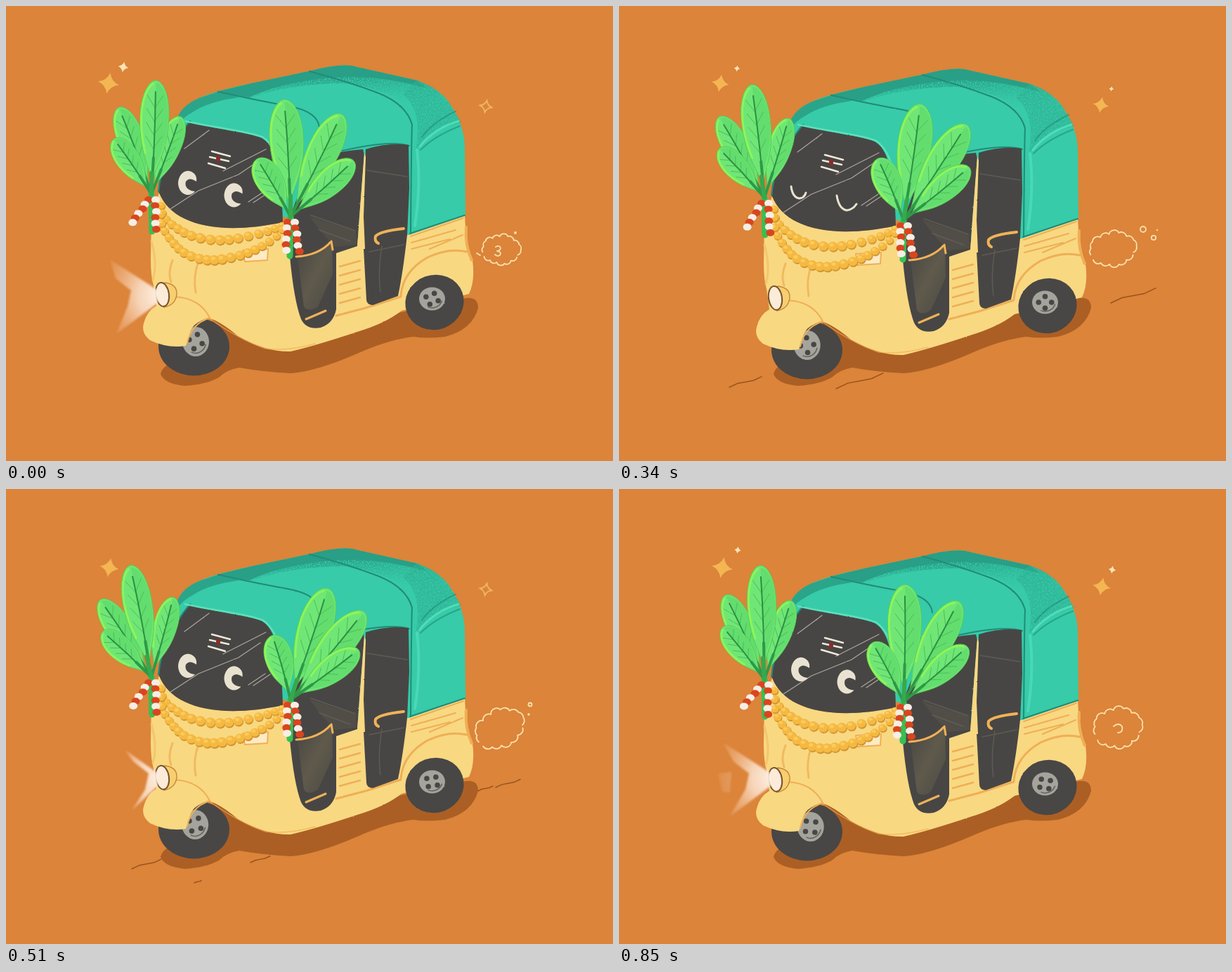
Write an HTML page that moves like this. It is 864 px wide and 648 px high and loops after 1020 ms.

```html
<!DOCTYPE html>
<html lang="en">
<head>
<meta charset="utf-8">
<title>Festive auto rickshaw</title>
<style>
html, body { margin: 0; width: 100%; height: 100%; overflow: hidden; background: #db843a; }
svg { display: block; width: 100vw; height: 100vh; }
.line { fill: none; stroke-linecap: round; stroke-linejoin: round; }
.leaf path { vector-effect: non-scaling-stroke; }
.trim { stroke: #efaf55; stroke-width: 3; }
.smoke { stroke: #fbe0ac; stroke-width: 1.8; }
.road { stroke: #9a531d; stroke-width: 1.5; }
</style>
</head>
<body>
<svg viewBox="0 0 864 648">
<defs>
  <filter id="rough" x="-5%" y="-5%" width="110%" height="110%" color-interpolation-filters="sRGB">
    <feTurbulence type="fractalNoise" baseFrequency=".35" numOctaves="2" seed="4"/>
    <feDisplacementMap in="SourceGraphic" scale="1.5" xChannelSelector="R" yChannelSelector="G"/>
  </filter>
  <filter id="grain" color-interpolation-filters="sRGB">
    <feTurbulence type="fractalNoise" baseFrequency=".55" numOctaves="2" seed="9"/>
    <feColorMatrix values="0 0 0 0 0  0 0 0 0 0  0 0 0 0 0  6 0 0 0 -2" result="dots"/>
    <feComposite in="SourceGraphic" in2="dots" operator="in"/>
  </filter>
  <filter id="soft"><feGaussianBlur stdDeviation="1.5"/></filter>
  <radialGradient id="glow" gradientUnits="userSpaceOnUse" cx="220" cy="412" r="90">
    <stop offset="0" stop-color="#fff3e6"/>
    <stop offset=".35" stop-color="#fbe3cf" stop-opacity=".85"/>
    <stop offset=".75" stop-color="#f3b98c" stop-opacity=".55"/>
    <stop offset="1" stop-color="#ec9c5e" stop-opacity=".4"/>
  </radialGradient>
  <linearGradient id="top" x1="0" y1="0" x2=".25" y2="1">
    <stop offset=".3" stop-color="#279c83"/>
    <stop offset="1" stop-color="#2fb898" stop-opacity="0"/>
  </linearGradient>
  <linearGradient id="seat" x1="0" y1="0" x2="1" y2="1">
    <stop offset="0" stop-color="#484644"/>
    <stop offset=".5" stop-color="#5f5a4b"/>
    <stop offset="1" stop-color="#4c4a45"/>
  </linearGradient>
</defs>
<rect width="864" height="648" fill="#db843a"/>
<path fill="#ac5f24" d="M220 524Q224 509 245 507L300 440L400 470L640 420Q672 408 672 430Q664 461 625 471Q598 474 580 471Q545 475 500 495Q440 521 405 523Q365 521 332 515Q314 518 303 529Q285 539 254 541Q225 538 220 524Z"/>
<g id="roads" class="line road"></g>

<g id="cab"><g filter="url(#rough)">
  <ellipse cx="267.500" cy="485" rx="50.500" ry="41.500" fill="#484745"/>
  <g id="frontHub"></g>
  <path fill="#f9d882" d="M207 300L218 266C235 310 300 328 394 308L405 300H512L573 325L653 298Q654 335 664 362Q668 392 659 410L563 434Q540 452 500 464Q440 484 405 492Q370 493 330 470Q305 449 288 444Q264 452 262 466L256 484Q230 488 205 476Q192 466 196 452Q200 435 214 427L210 398Q206 385 206 360Z"/>
  <g class="line trim">
    <path d="M240 414Q276 416 290 444Q263 453 258 480" stroke-width="2"/>
    <path d="M237 362Q230 380 235 393M274 364Q266 385 270 408" opacity=".75"/>
    <path d="M290 445Q335 477 370 488Q400 492 440 481" stroke-width="1.500" opacity=".7"/>
    <path d="M470 441L512 430L562 414M562 412Q565 378 600 358Q630 344 656 350"/>
    <path d="M576 328L651 302M577 337L640 319M577 346L632 332M603 346L650 326" stroke-width="2"/>
    <path d="M655 315Q653 341 663 362" stroke-width="4"/>
    <g id="slats" stroke-width="2.500"></g>
    <path fill="#fdebc5" d="M337 348L373 346L372 362L340 364Z" stroke-width="2"/>
  </g>
  <path d="M207 335Q216 367 209 390" class="line" stroke="#f4c66c" stroke-width="3"/>

  <path fill="#37cba9" d="M242 165Q246 145 275 131Q300 120 350 110L435 92Q480 80 500 87L585 106Q622 120 634 143Q652 170 653 200L654 298L574 326L500 330L395 300L240 200Z"/>
  <path fill="url(#top)" filter="url(#grain)" d="M300 122L350 110L435 92Q480 80 500 87L585 106Q612 115 621 127L578 148Q540 116 480 110Q400 111 345 132Z"/>
  <path fill="#289f86" d="M300 122L350 110L432 93L460 102Q390 109 346 130ZM432 93Q480 80 500 87L585 106L600 117Q520 96 470 102Z"/>
  <path fill="#2aa58a" d="M243 162Q249 142 275 131L302 122L332 130Q288 136 266 151Q253 158 247 166Z"/>
  <path fill="#2eb294" filter="url(#grain)" d="M584 106Q620 119 634 143L648 166Q612 173 583 205Q594 150 565 125Z" opacity=".7"/>
  <g class="line" stroke="#218b77" stroke-width="2">
    <path d="M302 122Q350 133 405 143Q444 151 446 173M432 93Q485 107 530 124Q570 140 578 169Q577 190 576 324"/>
    <path d="M640 150Q606 166 592 187M646 171Q610 185 590 205" opacity=".6"/>
    <path d="M575 324L653 298M440 216Q540 188 574 199"/>
    <path d="M262 165Q222 215 218 264" stroke-width="4"/>
    <path d="M585 205Q591 255 582 313" stroke="#49d8b8" stroke-width="4"/>
    <path d="M644 164Q610 174 589 200" stroke="#50ddb9" stroke-width="3"/>
  </g>

  <path fill="#484644" d="M262 165C300 176 345 180 364 188C382 198 392 230 394 308C300 328 235 310 218 266Q222 215 262 165Z"/>
  <path class="line" stroke="#5ce0bb" stroke-width="2.500" d="M255 164C300 174 345 178 366 187Q384 200 390 230"/>
  <path class="line" stroke="#aaa69f" stroke-width="1.200" d="M254 203L289 177M309 235L370 204M234 289L274 263L331 240L362 219M345 279L369 263M352 280L376 264"/>
  <path fill="#484644" d="M436 218Q470 207 508 204L510 212L503 300L500 342L470 352V432Q466 452 448 458Q428 462 420 446Q410 420 404 357V300Z"/>
  <path fill="#484644" d="M512 204Q545 194 573 198L574 260L571 326Q565 380 558 413L522 426Q513 425 513 418L509 345L508 300Z"/>
  <path fill="#f9d882" d="M510 209L503 300L500 346H511L509 300L512 215Z"/>
  <path fill="url(#seat)" d="M415 357Q448 354 464 336L465 382L444 428Q430 437 424 428Z"/>
  <path fill="#57544b" d="M432 300L498 321L499 340L468 343L448 321Z" opacity=".65"/>
  <path class="line" stroke="#66625a" stroke-width="1.500" opacity=".75" d="M434 298L497 320M446 319L490 335M514 234L571 243M535 342Q529 380 533 407M517 350L566 340"/>
  <g class="line" stroke="#f0b258" stroke-width="3">
    <path d="M413 357Q446 355 463 335L465 347M427 446L455 434"/>
    <path d="M566 317Q531 321 526 328Q524 335 530 338" stroke-width="4"/>
  </g>
  <ellipse cx="610" cy="422" rx="42" ry="39" fill="#484745" transform="rotate(-20 610 422)"/>
  <g id="rearHub"></g>

  <g id="face">
    <path class="line" stroke="#efe9dc" stroke-width="2.400" d="M293 207L319 214M290 215L317 221M288 224L312 231"/>
    <ellipse cx="302" cy="217.500" rx="3" ry="4.500" fill="#8e2c27"/>
    <g data-on="01345" fill="#e9e2d0">
      <path id="eye" d="M267 238C256 229 245 240 245 253C246 268 260 274 269 264C258 263 254 257 256 250Q261 243 271 250Q272 242 267 238Z"/>
      <use href="#eye" x="65.500" y="17.500"/>
    </g>
    <path data-on="2" class="line" stroke="#e9e2d0" stroke-width="3" d="M245 252Q247 268 257 269Q264 268 266 261M310 265Q313 284 324 286Q333 285 338 277"/>
  </g>
  <g id="garland"></g>
  <g id="plants"></g>
  <path fill="#f7ce70" stroke="#c58b39" stroke-width="1.500" d="M226 394Q244 396 243 411Q241 426 225 429Z"/>
  <ellipse cx="222.500" cy="411" rx="9.500" ry="17" fill="#fcebd8" stroke="#76532b" stroke-width="2" transform="rotate(-8 222 411)"/>
</g></g>
<g id="beams" fill="url(#glow)" filter="url(#soft)"></g>
<g id="stars"></g>
<g id="puffs" class="line smoke"></g>
</svg>
<script>
const LOOP = 1020;
const POSE = [0, 1, 2, 3, 2, 1];   // pose shown in each step
const DIP = [0, 3, 5, 0];          // how far the cab sinks in each pose
const rad = deg => deg * Math.PI / 180;
const at = id => document.getElementById(id);
const on = (steps, body) => `<g data-on="${steps}">${body}</g>`;
const perPose = draw => [0, 1, 2, 3].map(p =>
  on(POSE.map((q, i) => q == p ? i : '').join(''), draw(p))).join('');
const path = (d, attrs = '') => `<path d="${d}" ${attrs}/>`;
const stroke = (d, color, width) =>
  path(d, `class="line" stroke="${color}" stroke-width="${width}"`);
const oval = (x, y, rx, ry, fill) =>
  `<ellipse cx="${x}" cy="${y}" rx="${rx}" ry="${ry}" fill="${fill}"/>`;
// point at a clockwise angle from straight up
const polar = ([x, y], deg, r) => [x + r * Math.sin(rad(deg)), y - r * Math.cos(rad(deg))];

for (let i = 0; i < 5; i++)
  at('slats').innerHTML += path(`M475 ${371 + i * 13}l29-8`);

function hub(x, y, rx, ry, turn) {
  let s = oval(x, y, rx, ry, '#a4a49c');
  for (let a = turn; a < turn + 360; a += 90)
    s += oval(x + Math.cos(rad(a)) * rx * .5, y + Math.sin(rad(a)) * ry * .5, 3.8, 3.8, '#484745');
  return s + stroke(`M${x - rx * .3} ${y + ry * .72}A${rx * .78} ${ry * .78} 0 0 0 ${x + rx * .75} ${y + ry * .2}`, '#62625d', 1.5);
}
at('frontHub').innerHTML = perPose(p => hub(270 + 3 * Math.sin(p * 2), 478, 19, 21, 15 + p * 35));
at('rearHub').innerHTML = perPose(p => hub(606.5, 417, 18.5, 16.5, 20 + p * 35));

function beads(a, b, c, d, n) {
  let s = '';
  for (let i = 0; i <= n; i++) {
    const t = i / n, u = 1 - t;
    const mix = k => u * u * u * a[k] + 3 * u * u * t * b[k] + 3 * u * t * t * c[k] + t * t * t * d[k];
    const x = mix(0) + Math.sin(i * 5), y = mix(1) + Math.cos(i * 7);
    const r = 5.3 + 1.8 * Math.sin(Math.PI * t);
    s += oval(x + 1, y + 1.5, r, r, '#d19532') + oval(x, y, r, r - .5, '#f5b941') +
      oval(x - 1.5, y - 2, r * .45, r * .35, '#fbcb5e');
  }
  return s;
}
at('garland').innerHTML = perPose(p => {
  const sag = DIP[p] ? 6 : 0;
  return beads([221, 283], [228, 345 + sag], [340, 340 + sag], [394, 312], 16) +
    beads([221, 296], [226, 382 + sag], [345, 375 + sag], [392, 318], 19);
});

const BLADE = 'M.1 0C.25-.1 .36-.5 .68-.5C.88-.5 1-.24 1 0C1 .24 .88 .5 .68 .5C.36 .5 .25 .1 .1 0Z';
let veins = '';
for (let t = .4; t < .85; t += .12)
  veins += `M${t} 0L${t + .11} .28M${t} 0L${t + .11}-.28`;

// a unit leaf stretched from its base to its tip
function leaf(base, tip, w) {
  const dx = tip[0] - base[0], dy = tip[1] - base[1], k = w / Math.hypot(dx, dy);
  return `<g class="leaf" transform="matrix(${[dx, dy, -dy * k, dx * k, ...base]})">` +
    path(BLADE, 'fill="#70e676" stroke="#56cd58" stroke-width="1"') +
    path('M.15 0C.4 .03 .7 .04 .98 0C.98 .2 .88 .47 .68 .47C.4 .47 .3 .1 .15 0Z', 'fill="#63dd6d"') +
    stroke('M.36-.27Q.53-.46 .68-.46Q.9-.44 .97-.1', '#8cf559', 3) +
    stroke(veins, '#4dbd5a', 1) +
    stroke('M.1 0Q.5 .05 .9 0', '#2b9044', 2) +
    stroke('M0 0L.32 .02', '#2f9848', 4) + '</g>';
}

function tassel(top, deg, len, first) {
  let s = '';
  for (let i = 0; i < 6; i++) {
    const [x, y] = polar(top, deg, len * i / 5);
    s += oval(x + Math.sin(i * 4), y, 6, 5, (i + first) % 2 ? '#f6eee6' : '#d9451f');
  }
  return s;
}

// leaves: angle, length, width, share of the sway
const PLANTS = [
  {
    base: [207, 268], foot: [208, 321], sway: p => -4.3 * p, lean: 216,
    leaves: [[-20.5, 132, 37, 1], [20.5, 118, 33, .4], [2.3, 162, 41, 1], [-34, 95, 34, 1]]
  },
  {
    base: [405, 300], foot: [404, 356], sway: p => 18 * (p / 3) ** 1.6, lean: 184,
    leaves: [[-3, 167, 48, 1.2], [26.5, 163, 45, .75], [48.5, 120, 38, .3], [-30, 95, 39, .8]]
  }
];
function plant({ base, foot, sway, lean, leaves }, p) {
  const [x, y] = base, swing = 5 * Math.sin(p * 2);
  return stroke(`M${base}L${foot}`, '#38bf54', 9) +
    leaves.map(([deg, len, w, flex]) => leaf(base, polar(base, deg + sway(p) * flex, len), w)).join('') +
    stroke(`M${polar(base, sway(p), 30)}L${base}`, '#36a94c', 6) +
    tassel([x - 4, y + 8], lean + swing, 40, 0) +
    tassel([x + 6, y + 8], lean - 12 - (lean - 184) * .75 + swing / 2, 42, 1);
}
at('plants').innerHTML = perPose(p => PLANTS.map(one => plant(one, p)).join(''));

// light cone with a notch bitten out of its far side
const beam = (notch, tip = 148, top = 361, low = 467) =>
  path(`M215 404L${tip} ${top}L${Math.max(140, notch - 22)} 388L${notch} 405L${notch - 5} 428L${tip + 9} ${low}L216 423Z`);
at('beams').innerHTML = on('0', beam(178)) + on('1', beam(134)) + on('4', beam(182)) +
  on('3', beam(203, 170, 372, 458)) +
  on('5', beam(185) + path('M141 405L160 403L158 432L147 432Z', 'opacity=".6"'));

const GOLD = '#f4b653', CREAM = '#fce3b5';
function star(x, y, r, fill, line = 'none') {
  const k = r * .22;
  const d = `M0 ${-r}Q${k} ${-k} ${r} 0Q${k} ${k} 0 ${r}Q${-k} ${k} ${-r} 0Q${-k} ${-k} 0 ${-r}Z`;
  return path(d, `fill="${fill}" stroke="${line}" stroke-width="1.6" transform="translate(${x} ${y}) rotate(10)"`);
}
at('stars').innerHTML =
  on('0', star(146, 110, 15, GOLD) + star(167, 87, 7.5, CREAM)) +
  on('03', star(683, 143, 8.5, 'none', '#f6bd69')) +
  on('15', star(147, 112, 15, GOLD) + star(169, 87, 5, CREAM) + star(687, 139, 13, GOLD) + star(702, 115, 5.5, CREAM)) +
  on('24', star(144, 110, 12.5, GOLD) + star(168, 89, 4.5, CREAM) + star(686, 141, 11.5, GOLD) + star(701, 118, 3.5, CREAM)) +
  on('3', star(147, 112, 13.5, GOLD));

// scalloped oval, open at the left and lower right
function cloud(x, y, rx, ry, tilt = 0) {
  const arc = (from, to, n) => {
    let d = '';
    for (let i = 0; i <= n; i++) {
      const a = rad(from + (to - from) * i / n), k = 1 + .05 * Math.sin(i * 4);
      const r = rx * rad(to - from) / n * .55;
      d += (i ? `A${r} ${r} 0 0 1 ` : 'M') + `${x + rx * k * Math.cos(a)} ${y + ry * k * Math.sin(a)}`;
    }
    return d;
  };
  return path(arc(170, 385, 9) + arc(395, 510, 5), `transform="rotate(${tilt} ${x} ${y})"`);
}
const ring = (x, y, r) => `<circle cx="${x}" cy="${y}" r="${r}"/>`;
at('puffs').innerHTML =
  on('0', cloud(705, 347, 27, 19) + ring(725, 323, 1) +
    path('M670 352L675 355M697 343Q703 340 704 345Q703 349 699 349Q706 350 703 355Q699 357 696 354')) +
  on('15', cloud(710, 340, 34, 26, -8) + path('M704 338Q711 332 716 338Q718 347 710 347')) +
  on('24', cloud(703, 346, 33, 22, -8) + ring(746, 318, 4) + ring(761, 330, 3.2) + ring(766, 319, .4)) +
  on('3', cloud(703, 341, 36, 24, -26) + ring(746, 307, 2.5) + ring(744, 321, .8));

// a crack climbing to the right with a slight wobble
function crack([x, y, len]) {
  let d = `M${x} ${y}`;
  for (let t = .25; t <= 1; t += .25)
    d += `L${x + len * t} ${y - len * (.33 * t + .035 * Math.sin(t * 2 * Math.PI))}`;
  return path(d);
}
const roads = (...list) => list.map(crack).join('');
at('roads').innerHTML =
  on('1', roads([126, 557, 47], [203, 503, 15], [270, 561, 106], [672, 433, 91])) +
  on('2', roads([157, 543, 46], [309, 545, 67], [700, 423, 64])) +
  on('3', roads([179, 541, 42], [268, 561, 10], [348, 532, 28], [672, 430, 21], [697, 425, 35])) +
  on('4', roads([208, 529, 11], [271, 561, 12], [320, 545, 47], [673, 430, 17], [708, 421, 61]));

function play(el, prop, value) {
  const keys = [0, 1, 2, 3, 4, 5, 5].map((step, i) =>
    ({ [prop]: value(step), offset: i / 6, easing: 'step-end' }));
  el.animate(keys, { duration: LOOP, iterations: Infinity }).startTime = 0;
}
play(at('cab'), 'transform', step => `translateY(${DIP[POSE[step]]}px)`);
play(at('face'), 'transform', step => `translateY(${POSE[step] == 1 ? 2 : 0}px)`);
document.querySelectorAll('[data-on]').forEach(el =>
  play(el, 'opacity', step => el.dataset.on.includes(step) ? 1 : 0));
</script>
</body>
</html>
```
